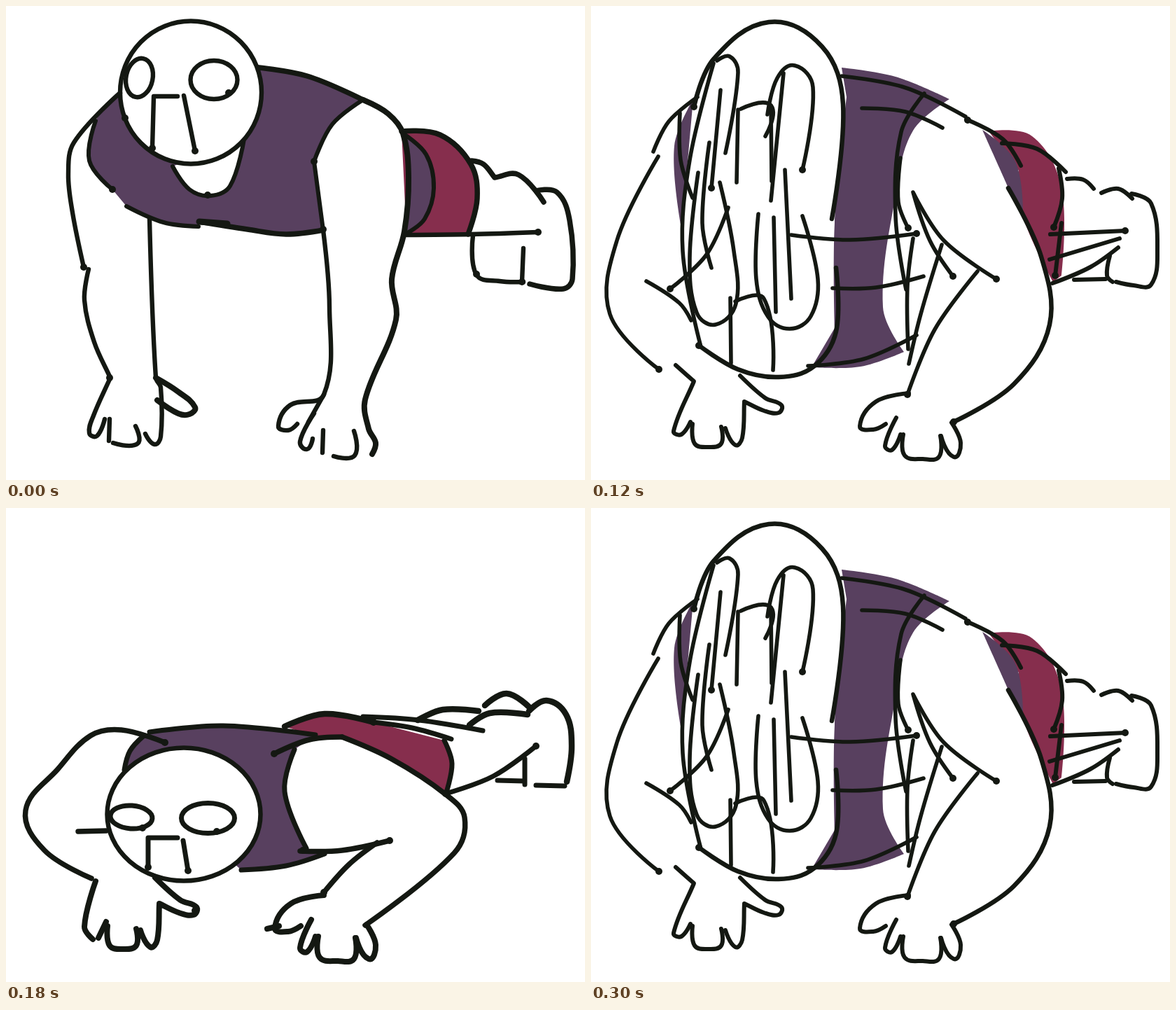
These frames come from a looping animation (827 px wide and 677 px high, 360 ms). An HTML page with a canvas:

```html
<!DOCTYPE html>
<html lang="en">
<head>
<meta charset="utf-8">
<title>Push-ups</title>
<style>
  html, body { margin: 0; width: 100%; height: 100%; overflow: hidden; background: #fff; }
  canvas { display: block; width: 100vw; height: 100vh; }
</style>
</head>
<body>
<canvas id="stage" width="827" height="677"></canvas>
<script>
const ctx = document.getElementById('stage').getContext('2d');
const INK = '#141812', SHIRT = '#58405f', SHORTS = '#862e4d', SKIN = '#fff';

// Smooth curve through the points; a repeated point makes a corner.
function trace(coords, start = true) {
  const p = [];
  for (let i = 0; i < coords.length; i += 2) p.push([coords[i], coords[i + 1]]);
  const handle = (i, reach) => {
    if (!p[i - 1] || !p[i + 1]) return p[i];
    const dx = p[i + 1][0] - p[i - 1][0], dy = p[i + 1][1] - p[i - 1][1];
    const k = reach / (Math.hypot(dx, dy) || 1);
    return [p[i][0] + dx * k, p[i][1] + dy * k];
  };
  if (start) ctx.moveTo(...p[0]); else ctx.lineTo(...p[0]);
  for (let i = 1; i < p.length; i++) {
    const reach = Math.hypot(p[i][0] - p[i - 1][0], p[i][1] - p[i - 1][1]) / 2.8;
    ctx.bezierCurveTo(...handle(i - 1, reach), ...handle(i, -reach), ...p[i]);
  }
}

function line(...coords) {
  ctx.beginPath();
  trace(coords);
  ctx.stroke();
}

function dot(x, y) {
  ctx.beginPath();
  ctx.arc(x, y, 5, 0, 7);
  ctx.fillStyle = INK;
  ctx.fill();
}

// A line that ends in a blot.
function blot(...coords) {
  line(...coords);
  dot(...coords.slice(-2));
}

function area(color, ...edges) {
  ctx.beginPath();
  edges.forEach((edge, i) => trace(edge, i === 0));
  ctx.fillStyle = color;
  ctx.fill();
}

function oval(x, y, rx, ry, tilt = 0) {
  ctx.beginPath();
  ctx.ellipse(x, y, rx, ry, tilt, 0, 7);
  ctx.fillStyle = SKIN;
  ctx.fill();
  ctx.stroke();
}

const pen = width => { ctx.lineWidth = width; };

function plantedHands() {
  line(145, 597, 148, 625, 167, 630, 186, 625, 186, 601);
  line(192, 603, 206, 627, 216, 617, 219, 565, 219, 565, 247, 578, 268, 581, 272, 570, 249, 560, 213, 528);
  line(454, 553, 407, 565, 384, 600, 403, 605, 421, 597);
  line(436, 588, 420, 628, 430, 634, 442, 612);
  line(446, 612, 448, 642, 474, 647, 497, 644, 499, 614);
  line(500, 614, 518, 644, 528, 624, 515, 595);
}

function up() {
  const back = [353, 87, 430, 100, 510, 134];
  const sleeve = [510, 134, 466, 169, 440, 222];
  const side = [440, 222, 453, 320];
  const hem = [453, 320, 400, 326, 345, 319, 276, 308];
  const chest = [275, 315, 225, 309, 172, 286];
  const shoulder = [152, 262, 119, 221, 128, 164, 163, 124];
  const neck = [238, 229, 262, 262, 292, 271, 320, 257, 340, 190];
  const seat = [565, 179, 620, 184, 664, 226, 673, 275, 660, 326];
  const waist = [567, 182, 600, 212, 611, 260, 598, 304, 572, 325];

  area(SHORTS, seat, [572, 327]);
  area(SHIRT, waist, [575, 250]);
  area(SHIRT, back, sleeve, side, hem, chest, shoulder);
  area(SKIN, neck);
  pen(6);
  [neck, sleeve, side, chest, waist].forEach(edge => line(...edge));
  line(152, 262, 119, 221, 128, 164);
  pen(7.5);
  [back, seat, hem].forEach(edge => line(...edge));
  pen(9);
  line(276, 308, 316, 311);

  pen(6.4);
  oval(264, 123.5, 101, 102);
  oval(190.5, 102.5, 19, 28, .2);
  oval(297, 105.5, 33.5, 27.5);
  blot(245, 129, 211, 129, 211, 129, 209, 203);
  blot(254, 128, 270, 207);

  blot(163, 124, 97, 195, 89, 240, 95, 295, 111, 373);
  line(118, 376, 112, 420, 126, 480, 149, 531, 149, 531, 125, 585, 119, 610, 130, 614, 141, 590);
  line(148, 590, 147, 621);
  line(153, 624, 188, 625, 185, 600);
  line(199, 611, 212, 626, 221, 615, 221, 545, 214, 531, 205, 304);
  line(453, 320, 462, 430, 454, 555, 406, 570, 389, 600, 403, 606, 416, 597);
  line(454, 555, 432, 594);
  line(440, 582, 420, 622, 430, 633, 438, 618);
  line(453, 606, 452, 638);
  line(468, 643, 498, 642, 497, 607);
  pen(8);
  line(214, 531, 246, 551, 270, 573, 262, 583, 246, 582, 216, 563);
  line(510, 134, 546, 154, 567, 182, 575, 245, 569, 322, 551, 390, 557, 448, 513, 562, 518, 604, 528, 624, 523, 640);

  pen(6.4);
  blot(570, 327, 665, 326, 760, 323);
  line(667, 328, 672, 384, 705, 393, 739, 394);
  blot(739, 346, 737, 394);
  pen(7.5);
  line(665, 221, 682, 226, 698, 245, 698, 245, 732, 241, 768, 280);
  line(757, 264, 787, 266, 805, 306, 809, 390, 796, 404, 748, 397);
  dot(170, 160); dot(318, 124); dot(152, 262); dot(148, 531);
  dot(288, 270); dot(440, 222); dot(453, 319); dot(672, 383);
}

function blur() {
  area(SHORTS, [568, 179, 630, 186, 672, 260, 672, 385], [660, 394, 617, 301, 611, 235]);
  area(SHIRT, [559, 177, 606, 222, 617, 301], [597, 262, 559, 177]);
  area(SHIRT, [358, 88, 435, 101, 512, 133], [512, 133, 460, 178, 437, 260, 417, 430, 447, 494],
    [447, 494, 385, 515, 315, 516], [348, 460, 348, 310, 365, 130]);
  area(SHIRT, [146, 133, 119, 200, 128, 311], [134, 270, 146, 133]);

  pen(6.5);
  line(147, 144, 175, 76, 254, 23, 330, 58, 360, 140, 344, 304);
  line(350, 374, 350, 465, 318, 515, 268, 530, 210, 519, 153, 484);
  pen(5.6);
  line(180, 78, 198, 72, 210, 95, 192, 210);
  line(175, 82, 141, 220, 131, 350, 157, 487);
  blot(185, 120, 172, 260);
  line(169, 195, 159, 310, 172, 374);
  line(153, 238, 141, 360, 151, 438, 178, 455, 207, 425, 204, 350, 184, 252);
  blot(196, 288, 165, 355, 113, 404);
  line(79, 393, 126, 424, 143, 449);
  line(214, 147, 257, 142, 249, 186);
  line(210, 148, 208, 252);
  line(257, 142, 258, 250);
  blot(252, 155, 266, 103, 291, 85, 317, 116, 302, 234);
  line(275, 96, 257, 278);
  line(239, 297, 236, 390, 253, 444, 284, 461, 314, 443, 324, 390, 302, 300);
  line(261, 302, 264, 437);
  line(277, 234, 286, 418);
  line(206, 422, 247, 418, 260, 520);
  line(199, 417, 200, 510);

  line(127, 153, 128, 220, 145, 274);
  line(152, 130, 111, 165, 89, 208);
  blot(286, 327, 370, 334, 465, 325);
  line(345, 403, 407, 402, 475, 386);
  line(310, 514, 390, 504, 465, 470);
  line(358, 100, 450, 117, 535, 158);
  line(387, 146, 449, 151, 502, 174);
  line(476, 125, 443, 180, 435, 300, 450, 405);
  blot(442, 217, 439, 280, 453, 317);
  line(460, 332, 452, 400, 453, 490);
  blot(460, 266, 484, 335, 517, 386);
  blot(461, 268, 504, 335, 579, 390);
  line(501, 341, 471, 440, 454, 511);
  blot(552, 379, 491, 462, 452, 555);
  blot(96, 215, 37, 335, 27, 440, 97, 519);
  pen(6.5);
  blot(596, 260, 643, 358, 655, 455, 604, 540, 518, 594);

  pen(6);
  line(536, 162, 588, 190, 614, 228);
  line(587, 196, 637, 204, 678, 237);
  blot(668, 232, 673, 275, 661, 316);
  blot(672, 310, 663, 385);
  blot(656, 326, 763, 321);
  line(655, 362, 755, 332);
  line(659, 396, 713, 373, 753, 345);
  line(741, 357, 737, 385, 745, 394);
  line(680, 247, 703, 248, 718, 261);
  line(729, 267, 753, 261, 773, 275);
  line(772, 268, 800, 282, 809, 350, 800, 398, 775, 399, 750, 394);
  line(690, 391, 735, 390);
  line(121, 513, 147, 536, 147, 536, 118, 607, 129, 612, 142, 594);
  plantedHands();
  dot(147, 144); dot(154, 485); dot(538, 163);
}

function down() {
  const back = [205, 320, 310, 311, 442, 324];
  const sleeve = [412, 345, 398, 405, 429, 486];
  const hem = [455, 494, 400, 511, 336, 517];
  const collar = [169, 374, 177, 347, 196, 326];
  const rump = [398, 312, 455, 294, 525, 306];
  const thigh = [480, 327, 550, 358, 628, 409];
  const cuff = [626, 332, 637, 365, 628, 409];

  area(SHORTS, rump, cuff, thigh.slice(2, 4), [480, 327, 440, 326]);
  area(SHIRT, back, sleeve, hem, [250, 440], collar);
  pen(7);
  [back, sleeve, hem, collar, cuff].forEach(edge => line(...edge));
  pen(6.5);
  oval(254, 437.5, 109.5, 95);
  pen(7);
  oval(179, 441.5, 30, 16.5, .07);
  oval(288.5, 443, 38, 21.5);
  line(203, 513, 203, 471, 203, 471, 245, 471);
  blot(253, 475, 260, 518);

  pen(7.5);
  blot(122, 529, 55, 489, 28, 432, 74, 373, 121, 325, 165, 317, 227, 335);
  line(103, 462, 143, 461);
  blot(480, 327, 433, 331, 383, 351);
  line(...thigh, 655, 442, 640, 493, 513, 596);
  blot(420, 490, 480, 489, 548, 475);
  line(530, 478, 490, 509, 454, 549);

  pen(7);
  line(525, 306, 580, 314, 636, 330);
  line(510, 298, 590, 303, 681, 318);
  line(628, 408, 696, 383, 757, 340);
  line(741, 358, 741, 395);
  line(702, 389, 740, 390);
  line(757, 396, 798, 397);
  pen(8.5);
  line(...rump);
  line(588, 303, 624, 288, 675, 290);
  line(662, 310, 691, 293, 745, 295);
  line(684, 282, 715, 265, 748, 285);
  line(747, 290, 772, 275, 800, 295, 808, 340, 801, 391);

  pen(8);
  line(128, 533, 112, 598, 124, 616);
  line(132, 614, 143, 591);
  line(373, 601, 390, 597);
  plantedHands();
  dot(203, 513); dot(301, 462); dot(195, 457); dot(757, 340); dot(270, 575);
  dot(454, 549); dot(628, 408); dot(424, 489); dot(525, 306);
}

function poseAt(ms) {
  if (ms < 120) return up;
  return ms >= 180 && ms < 300 ? down : blur;
}

let shown;
function tick() {
  const pose = poseAt(performance.now() % 360);
  if (pose !== shown) {
    shown = pose;
    ctx.fillStyle = SKIN;
    ctx.fillRect(0, 0, 827, 677);
    ctx.strokeStyle = INK;
    ctx.lineCap = ctx.lineJoin = 'round';
    pose();
  }
  requestAnimationFrame(tick);
}
tick();
</script>
</body>
</html>
```
